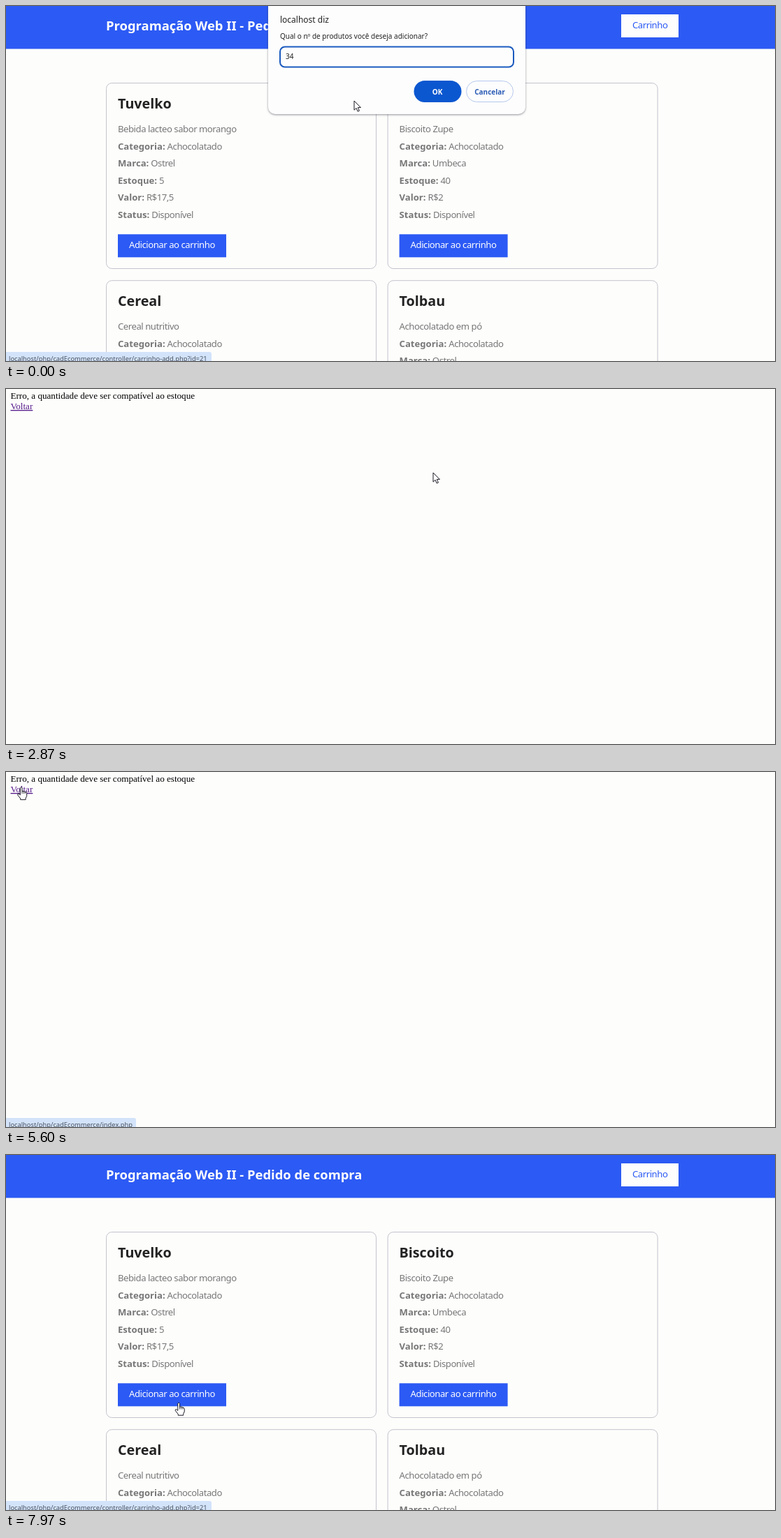
These frames come from a looping animation (1100x509 px, 8000 ms). An HTML page:

```html
<!DOCTYPE html>
<html lang="pt-BR">
<head>
<meta charset="utf-8">
<title>Pedido de compra</title>
<style>
  html, body { margin: 0; height: 100%; overflow: hidden; background: #fdfdfc; }
  svg { display: block; width: 100vw; height: 100vh; }
  text { font: 13.1px "Noto Sans", sans-serif; fill: #777; letter-spacing: -.034em; }
  .bold { font-weight: 700; letter-spacing: 0; }
  .title { font-size: 18.4px; font-weight: 700; fill: #fdfdfd; letter-spacing: 0; }
  .name { font-size: 19.7px; font-weight: 700; fill: #222; letter-spacing: 0; }
  .light { fill: #fdfdfd; }
  .link { fill: #2c5af4; }
  .blue { fill: #2c5af4; }
  .card { fill: none; stroke: #c3c3cc; }
  .ui text { font-size: 10px; fill: #222; letter-spacing: 0; }
  .ui .origin { font-size: 12px; font-weight: 500; }
  .ui .button { font-weight: 600; text-anchor: middle; }
  #dialogBox { fill: #fdfdfd; filter: drop-shadow(0 1px 1.5px #3348); }
  #error text { font: 13.12px "Liberation Serif", serif; fill: #000; letter-spacing: 0; }
  #error .visited { fill: #551a8b; text-decoration: underline; }
  #status text { font-size: 9.3px; fill: #4a5260; }
  .cursor path { fill: #fff; stroke: #181822; stroke-linejoin: round; }
</style>
</head>
<body>
<svg viewBox="0 0 1100 509" preserveAspectRatio="none">
  <rect width="1100" height="509" fill="#fdfdfc"/>

  <g id="store">
    <rect class="blue" width="1100" height="61.5"/>
    <text class="title" x="143" y="35">Programação Web II - Pedido de compra</text>
    <rect class="light" x="880" y="12" width="82" height="33"/>
    <text class="link" x="896" y="32">Carrinho</text>
    <g id="cards"></g>
  </g>

  <g id="dialog" class="ui">
    <rect id="dialogBox" x="375" y="-20" width="368" height="175" rx="10"/>
    <text class="origin" x="392" y="23.5">localhost diz</text>
    <text x="392" y="47">Qual o nº de produtos você deseja adicionar?</text>
    <rect x="392" y="58.5" width="334" height="29" rx="7" fill="#fdfdfd" stroke="#1b5abf" stroke-width="2"/>
    <text x="400" y="76">34</text>
    <path id="caret" d="M411.5 67V78.5" stroke="#111"/>
    <rect id="ok" x="583.5" y="107" width="68" height="31" rx="15.5"/>
    <text class="button" x="617" y="126.5" style="fill:#fff">OK</text>
    <rect x="658.5" y="107.5" width="67" height="30" rx="15" fill="#fdfdfd" stroke="#b5c8ee"/>
    <text class="button" x="692" y="126.5" style="fill:#2a5bb5">Cancelar</text>
  </g>

  <g id="error">
    <text x="6.5" y="14">Erro, a quantidade deve ser compatível ao estoque</text>
    <text class="visited" x="6.5" y="29">Voltar</text>
  </g>

  <g id="status" class="ui">
    <rect id="statusBox" x="-5" y="496" height="20" rx="3" fill="#d3e3fa"/>
    <text id="statusText" x="4" y="508.7"></text>
  </g>

  <g id="arrow" class="cursor">
    <path d="M0 0V13.2L3.1 10.4 5.2 15.2 7.4 14.2 5.3 9.6H9.4Z"/>
  </g>
  <g id="hand" class="cursor">
    <path d="M-1.2 1.2Q.2-.9 1.5 1.2V6.2L3.6 6 5.7 6.8 7.2 7.3 8.2 9V13L6.6 16.3V18.2H-.8V16.5L-4.7 11.6Q-5.2 9.4-3.3 9.6L-1.2 11.4Z"/>
    <path d="M1.5 6V9.5M3.7 6.4V9.5M5.8 7V9.5" stroke-width=".8"/>
  </g>
</svg>

<script>
const LOOP = 8000;
const ERROR_OPENS = 1250, STORE_RETURNS = 5700;
const $ = id => document.getElementById(id);

const products = [
  ["Tuvelko", "Bebida lacteo sabor morango", "Ostrel", "5", "17,5"],
  ["Biscoito", "Biscoito Zupe", "Umbeca", "40", "2"],
  ["Cereal", "Cereal nutritivo", "Umbeca", "", ""],
  ["Tolbau", "Achocolatado em pó", "Ostrel", "", ""],
];

function card([name, description, brand, stock, price], index) {
  const x = 143.5 + index % 2 * 402.6, y = 110.5 + (index >> 1) * 283.2;
  const fields = [
    ["Categoria", "Achocolatado"], ["Marca", brand], ["Estoque", stock],
    ["Valor", "R$" + price], ["Status", "Disponível"],
  ];
  const rows = fields.map(([label, value], i) =>
    `<text x="16.5" y="${95 + i * 24.55}"><tspan class="bold">${label}:</tspan> ${value}</text>`);
  return `<g transform="translate(${x} ${y})">
    <rect class="card" width="386" height="266" rx="8"/>
    <text class="name" x="16.5" y="36.7">${name}</text>
    <text x="16.5" y="70.4">${description}</text>${rows.join("")}
    <rect class="blue" x="16.5" y="216.8" width="155" height="33"/>
    <text class="light" x="32.5" y="236.5">Adicionar ao carrinho</text></g>`;
}
$("cards").innerHTML = products.map(card).join("");

// Pointer moves: start, end, destination x and y, easing
const smooth = p => p * p * (3 - 2 * p);
const speedUp = p => p ** 1.5;
const slowDown = p => 1 - (1 - p) ** 2;
const moves = [
  [60, 620, 611, 120, smooth],
  [3250, 3900, 175, 28, speedUp],
  [3900, 4400, 21.5, 21.5, slowDown],
  [6350, 7500, 247, 355, smooth],
];

function pointerAt(t) {
  let x = 498, y = 136;
  for (const [start, end, toX, toY, ease] of moves) {
    const p = ease(Math.min(1, Math.max(0, (t - start) / (end - start))));
    x += (toX - x) * p;
    y += (toY - y) * p;
  }
  return [x, y];
}

// Link hints: start, end, fade time, width, address
const hints = [
  [-500, 250, 100, 294, "carrinho"],
  [4450, STORE_RETURNS, 250, 186, "index"],
  [7650, 9000, 100, 294, "carrinho"],
];
const addresses = {
  carrinho: "localhost/php/cadEcommerce/controller/carrinho-add.php?id=21",
  index: "localhost/php/cadEcommerce/index.php",
};

const show = (id, visible) => $(id).setAttribute("visibility", visible ? "visible" : "hidden");

function draw(t) {
  const onError = t >= ERROR_OPENS && t < STORE_RETURNS;
  show("store", !onError);
  show("error", onError);
  show("dialog", t < ERROR_OPENS);
  show("caret", t < ERROR_OPENS && t % 1000 >= 500);

  const [x, y] = pointerAt(t);
  $("ok").setAttribute("fill", x > 584 ? "#2467d0" : "#0b57d0");

  const onLink = t > 4000 && (x < 39 && y < 32 || x > 160 && y > 327);
  show("arrow", !onLink);
  show("hand", onLink);
  for (const id of ["arrow", "hand"]) $(id).setAttribute("transform", `translate(${x} ${y})`);

  const hint = hints.find(([start, end, fade]) => t >= start && t < end + fade);
  show("status", hint);
  if (hint) {
    const [start, end, fade, width, page] = hint;
    $("statusBox").setAttribute("width", width + 5);
    $("statusText").textContent = addresses[page];
    $("status").setAttribute("opacity", Math.min(1, (t - start) / 100, (end + fade - t) / fade));
  }
}

const begin = performance.now();
function tick() {
  draw((performance.now() - begin) % LOOP);
  requestAnimationFrame(tick);
}
tick();
</script>
</body>
</html>
```
